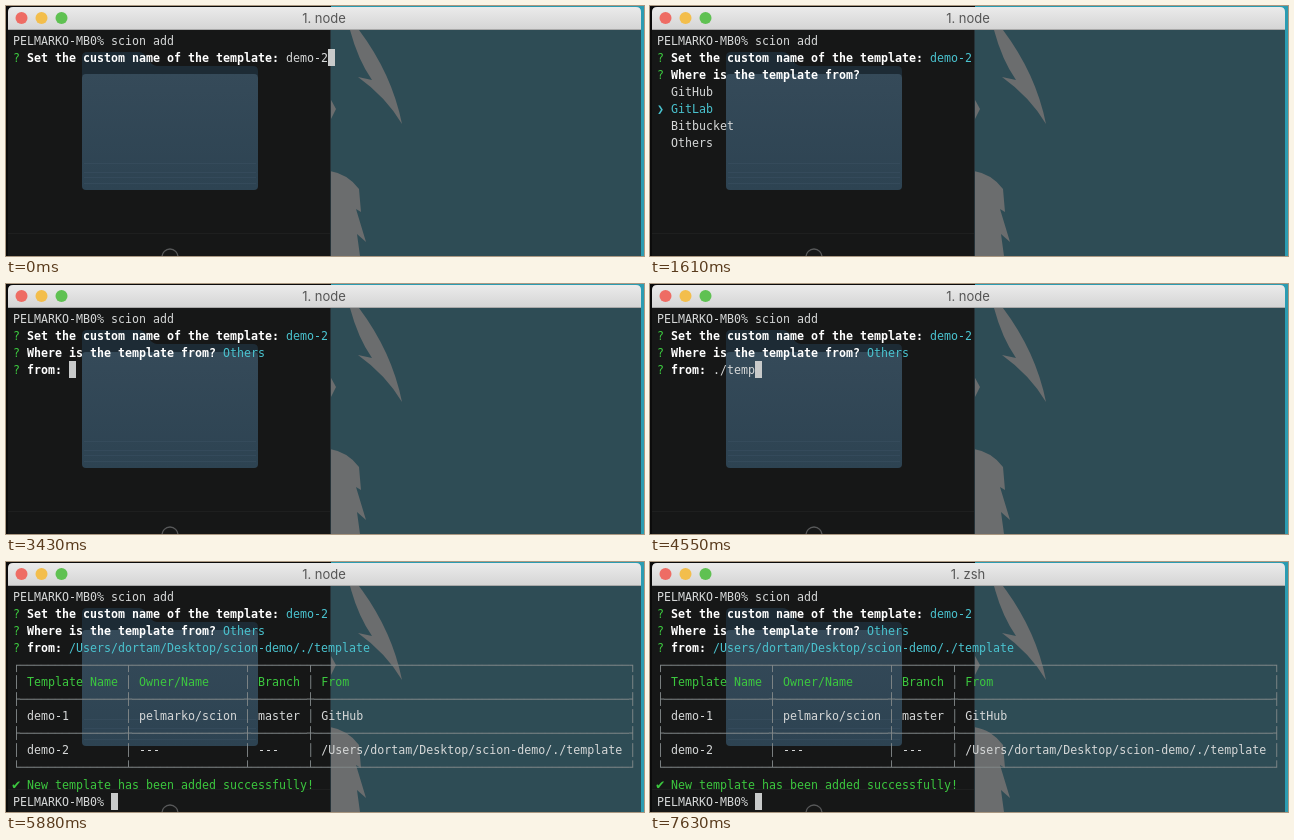
An HTML page for the animation above (7700 ms loop, 638 px wide and 250 px high).

```html
<!DOCTYPE html>
<html>
<head>
<meta charset="utf-8">
<title>Terminal</title>
<style>
html, body { margin: 0; width: 100%; height: 100%; overflow: hidden; background: #111; }
#stage { position: relative; width: 638px; height: 250px; overflow: hidden; }
svg { position: absolute; left: 0; top: 0; }
#title { position: absolute; left: 0; top: 1px; width: 636px; font: 13px/23px Inter, sans-serif; color: #555; text-align: center; }
pre { position: absolute; left: 7px; top: 27px; margin: 0; font: 11.628px/17px "DejaVu Sans Mono", monospace; letter-spacing: .012px; color: #d6d8d8; }
pre b { color: #fff; }
.g { color: #3cc83f; }
.c { color: #4ac3cf; }
.d { color: #828889; }
.i { display: inline-block; width: 7px; }
.big { font-size: 14px; text-indent: -1px; }
.k { background: #c8caca; display: inline-block; width: 7px; height: 17px; margin-top: -1px; vertical-align: top; }
</style>
</head>
<body>
<div id="stage">
<svg width="638" height="250">
  <defs>
    <linearGradient id="bar" x2="0" y2="1"><stop stop-color="#ebebeb"/><stop offset="1" stop-color="#d4d4d4"/></linearGradient>
    <linearGradient id="front" x2="0" y2="1"><stop stop-color="#354a59"/><stop offset="1" stop-color="#2d4352"/></linearGradient>
  </defs>
  <rect width="325" height="250" fill="#0b0b0b"/>
  <rect x="325" width="313" height="250" fill="#2b9cb2"/>
  <rect x="2" y="23" width="322" height="227" fill="#161717"/>
  <rect x="324" y="23" width="311" height="227" fill="#2e4c55"/>
  <!-- wallpaper shapes -->
  <g fill="#6b6d6e">
    <path d="M344 24H353Q386 68 396 118Q380 91 352 71L366 74Q352 54 344 24Z"/>
    <path d="M324 92L330 103L324 115Z"/>
    <path d="M324 165Q342 168 353 183L355 206L350 203L360 236L351 228L354 250H324Z"/>
  </g>
  <path d="M324.5 24V250" stroke="#263238"/>
  <!-- folder -->
  <path d="M76 70V51Q76 46 81 46H133Q138 46 142 53Q146 60 151 60H247Q252 60 252 65V70Z" fill="#1d2b35"/>
  <rect x="76" y="68" width="176" height="116" rx="4" fill="url(#front)"/>
  <path d="M78 157.5H250M78 166.5H250M78 171.5H250M78 177.5H250" stroke="#3b5163" opacity=".5"/>
  <path d="M2 227.5H324" stroke="#1e1f1f"/>
  <circle cx="164" cy="251" r="8" fill="none" stroke="#58595a" stroke-width="1.3"/>
  <!-- title bar -->
  <path d="M2 24V6Q2 1 7 1H630Q635 1 635 6V24Z" fill="url(#bar)"/>
  <path d="M2 23.5H635" stroke="#a9a9a9"/>
  <circle cx="15.5" cy="12" r="6" fill="#ee6c64"/>
  <circle cx="35.5" cy="12" r="6" fill="#f3be4c"/>
  <circle cx="55.5" cy="12" r="6" fill="#5fc152"/>
</svg>
<div id="title"></div>
<pre id="out"></pre>
<svg width="638" height="250">
  <defs><path id="beam" d="M-4 -8Q0 -8 0 -5Q0 -8 4 -8M0 -5V5M-4 8Q0 8 0 5Q0 8 4 8M-2 2H2"/></defs>
  <g id="mouse" fill="none">
    <use href="#beam" stroke="#111" stroke-width="3"/>
    <use href="#beam" stroke="#eee" stroke-width="1.2"/>
  </g>
</svg>
</div>
<script>
const LOOP = 7700;
const ASKED = 70, CHOSEN = 2170, ADDED = 5810, EXITED = 6300;
const ARROWS = [1540, 1680, 1820];
const KEYS = [3500, 3640, 4060, 4200, 4340, 4480, 4620, 4690, 4760, 4830];
const HOSTS = ["GitHub", "GitLab", "Bitbucket", "Others"];
const PATH = "/Users/dortam/Desktop/scion-demo/./template";
const WIDTHS = [13, 14, 6, 43];
const PROMPT = "PELMARKO-MB0% ";
const CURSOR = '<span class="k"></span>';
const $ = id => document.getElementById(id);

const tint = (cls, text) => `<span class="${cls}">${text}</span>`;
const ask = (question, answer) => `${tint("g", "?")} <b>${question}</b> ${answer}`;
const count = (times, t) => times.filter(x => x <= t).length;

function rule(left, mid, right) {
  return tint("d", left + WIDTHS.map(w => "─".repeat(w + 2)).join(mid) + right);
}

function row(cells, cls = "") {
  const bar = tint("d", "│");
  return bar + cells.map((s, i) => tint(cls, ` ${s.padEnd(WIDTHS[i])} `)).join(bar) + bar;
}

const TABLE = [
  rule("┌", "┬", "┐"),
  row(["Template Name", "Owner/Name", "Branch", "From"], "g"),
  rule("├", "┼", "┤"),
  row(["demo-1", "pelmarko/scion", "master", "GitHub"]),
  rule("├", "┼", "┤"),
  row(["demo-2", "---", "---", PATH]),
  rule("└", "┴", "┘"),
  tint("g", tint("i big", "✔") + " New template has been added successfully!"),
  PROMPT + CURSOR
];

function screen(t) {
  const lines = [PROMPT + "scion add"];
  const name = "Set the custom name of the template:";
  if (t < ASKED) return [...lines, ask(name, "demo-2" + CURSOR)];
  lines.push(ask(name, tint("c", "demo-2")));

  const origin = "Where is the template from?";
  if (t < CHOSEN) {
    const picked = count(ARROWS, t);
    const hint = picked ? "" : "(Use arrow keys)";
    const list = HOSTS.map((h, i) => i == picked ? tint("c", tint("i", "❯") + " " + h) : "  " + h);
    return [...lines, ask(origin, hint), ...list];
  }
  lines.push(ask(origin, tint("c", "Others")));

  if (t < ADDED) return [...lines, ask("from:", "./template".slice(0, count(KEYS, t)) + CURSOR)];
  return [...lines, ask("from:", tint("c", PATH)), ...TABLE];
}

function pointer(t) {
  if (t < 6650 || t > 7280) return [-50, -50];
  if (t < 6930) {
    const p = 1 - (1 - (t - 6650) / 280) ** 2;
    return [336 - 12 * p, 184 + 18 * p];
  }
  const p = Math.max(0, (t - 7070) / 210);
  return [324, 202 + 58 * p * p];
}

let shown;
function draw(now) {
  const t = now % LOOP;
  const html = screen(t).join("\n");
  if (html != shown) $("out").innerHTML = shown = html;
  $("title").textContent = t < EXITED ? "1. node" : "1. zsh";
  $("mouse").setAttribute("transform", `translate(${pointer(t)})`);
  requestAnimationFrame(draw);
}
draw(performance.now());
</script>
</body>
</html>
```
